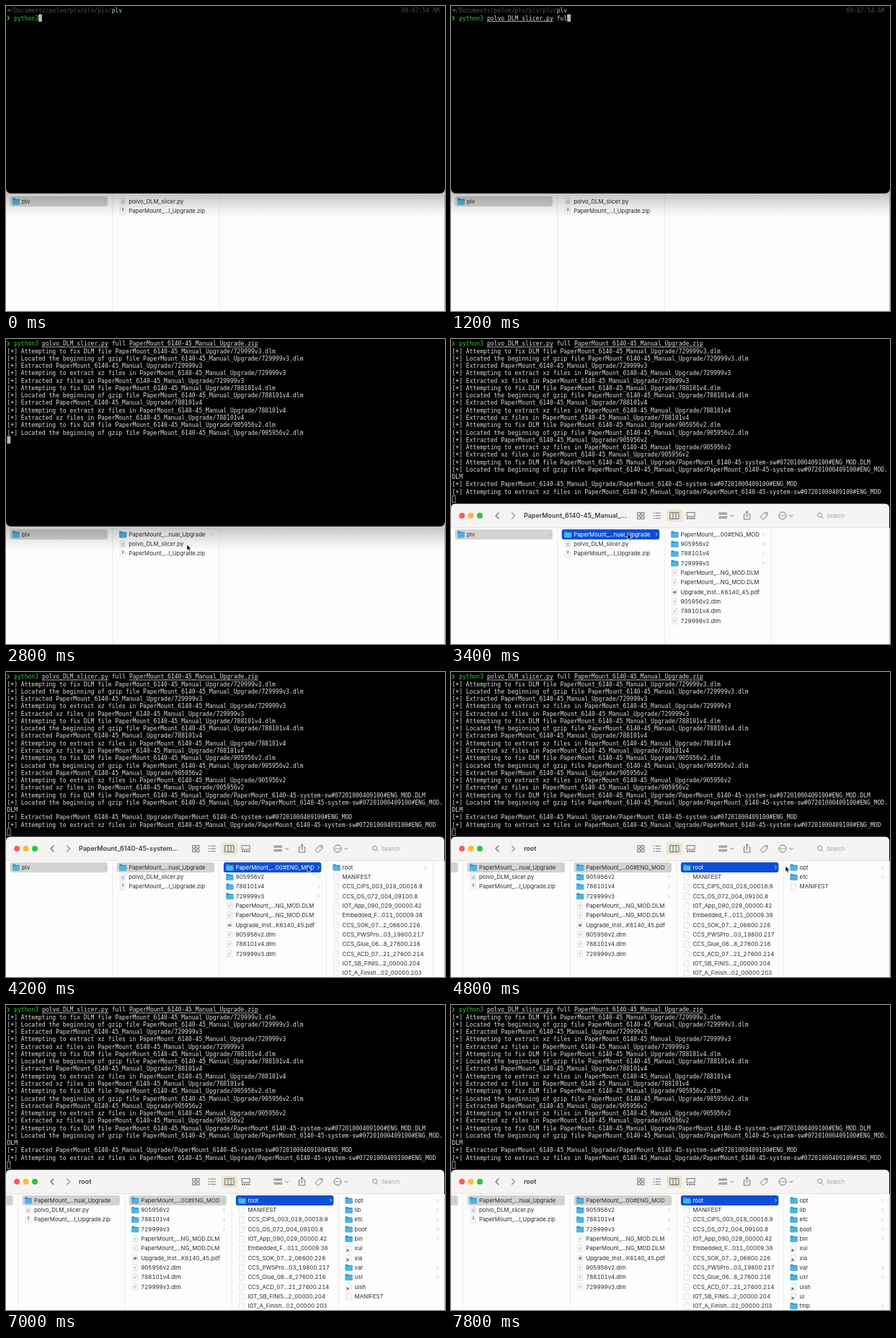
Animation of 609x423 px, one loop 8 s. Source, as an HTML page:

```html
<!DOCTYPE html>
<html lang="en">
<head>
<meta charset="utf-8">
<title>Terminal and file browser</title>
<style>
html, body { margin: 0; width: 100%; height: 100%; overflow: hidden; background: #000; }
svg { display: block; width: 100%; height: 100%; }
text { white-space: pre; }
.mono { font: 8.04px "DejaVu Sans Mono", monospace; }
.ui { font: 7.85px Inter, sans-serif; font-variant-numeric: tabular-nums; }
.title { font: 600 8.95px Inter, sans-serif; }
.find { font: 7.6px Inter, sans-serif; }
</style>
</head>
<body>
<svg id="stage" viewBox="0 0 609 423" xmlns="http://www.w3.org/2000/svg"></svg>
<script>
const LOOP = 8000, TICK = 200;
const CW = 4.84, LH = 10.27, X0 = 1.5;          // terminal grid
const COL = 148.2, ROW = 13.3, TOP = 271;       // browser columns
const FRONT = 3400, OPEN_MOD = 4000, OPEN_ROOT = 4400;

const model = 'PaperMount_6140-45';
const dir = model + '_Manual_Upgrade';
const mod = model + '-system-sw#07201000409100#ENG_MOD';
const script = 'polvo_DLM_slicer.py';
const green = '#35c935', grey = '#dedede';
const BLUE = '#0b4fd6', PATH = '#d4d3d2';

const log = [];
for (const id of ['729999v3', '788101v4', '905956v2', mod]) {
  const path = dir + '/' + id, last = id === mod;
  const file = path + (last ? '.DLM' : '.dlm');
  log.push('Attempting to fix DLM file ' + file, 'Located the beginning of gzip file ' + file,
    'Extracted ' + path, 'Attempting to extract xz files in ' + path);
  if (!last) log.push('Extracted xz files in ' + path);
}
const rows = log.flatMap(s => ('[+] ' + s).match(/.{1,125}/g));

// trailing "/" marks a folder, "@" a link
const home = [script, 'PaperMount_...l_Upgrade.zip'];
const unpacked = ['PaperMount_...nual_Upgrade/', ...home];
const parts = ['PaperMount_...00#ENG_MOD/', '905956v2/', '788101v4/', '729999v3/',
  'PaperMount_...NG_MOD.DLM', 'PaperMount_...NG_MOD.DLM', 'Upgrade_Inst...K6140_45.pdf',
  '905956v2.dlm', '788101v4.dlm', '729999v3.dlm'];
const modules = ['root/', 'MANIFEST', 'CCS_CiPS_003_018_00018.9', 'CCS_OS_072_004_09100.8',
  'IOT_App_090_029_00000.42', 'Embedded_F...011_00009.38', 'CCS_SOK_07...2_06600.226',
  'CCS_PWSPro...03_19800.217', 'CCS_Glue_06...8_27600.216', 'CCS_ACD_07...21_27600.214',
  'IOT_SB_FINIS...2_00000.204', 'IOT_A_Finish...02_00000.203'];
const tree = 'opt/ lib/ etc/ boot/ bin/ xui@ xia@ var/ usr/ uish@ ui@ tmp/'.split(' ');

// [time, value] steps
const typed = [[0, ''], [200, ' '], [400, ' p'], [600, ' ' + script + ' '],
  [1000, ' ' + script + ' f'], [1200, ' ' + script + ' ful'], [1400, ' ' + script + ' full '],
  [1600, ' ' + script + ' full P'], [1800, ' ' + script + ' full ' + dir + '.zip']];
const printed = [[0, 0], [2200, 1], [2400, 3], [2600, 7], [2800, 12], [3000, 14], [3200, 17], [3400, 20]];
const grown = [[0, 0], [6400, 3], [6600, 5], [6800, 8], [7000, 10], [7200, 12]];
const mouse = [[2600, 262, 291], [2800, 251, 285], [3200, 246, 271], [3400, 245, 270],
  [3800, 372, 269], [4000, 372, 269], [4400, 464, 269], [4800, 464, 269], [5400, 540, 425]];

const at = (steps, t) => steps.filter(s => s[0] <= t).pop()[1];
const rect = (x, y, w, h, fill, r = 0, more = '') =>
  `<rect x="${x}" y="${y}" width="${w}" height="${h}" rx="${r}" fill="${fill}" ${more}/>`;
const line = (d, color, w = 1, fill = 'none') =>
  `<path d="${d}" fill="${fill}" stroke="${color}" stroke-width="${w}" stroke-linecap="round" stroke-linejoin="round"/>`;
const dot = (x, y, r, fill, more = '') => `<circle cx="${x}" cy="${y}" r="${r}" fill="${fill}" ${more}/>`;
const label = (cls, x, y, s, fill) => `<text class="${cls}" x="${x}" y="${y}" fill="${fill}">${s}</text>`;
const cell = (row, col, s, fill = grey) => label('mono', X0 + col * CW, 9.3 + row * LH, s, fill);

function linked(row, col, s) {
  return cell(row, col, s) + rect(X0 + col * CW, 10.6 + row * LH, s.length * CW, 0.8, grey);
}

function caret(row, col, hollow) {
  const x = X0 + col * CW, y = 1.2 + row * LH;
  return hollow ? rect(x + 0.4, y + 0.4, 4.1, 9.4, 'none', 0, 'stroke="#b4b4b4" stroke-width=".8"')
    : rect(x, y, CW, LH, '#b9b9b9');
}

function command(row, text) {
  const y = 6.5 + row * LH;
  const [, name, mode, zip] = text.split(' ');
  let s = line(`M2.4 ${y - 2.7}l2 2.7-2 2.7`, green, 1.2) + cell(row, 2, 'python3', green);
  if (name) s += name === script ? linked(row, 10, name) : cell(row, 10, name);
  if (mode) s += cell(row, 30, mode);
  if (zip) s += zip.length > 1 ? linked(row, 35, zip) : cell(row, 35, zip);
  return s;
}

function terminal(t) {
  const text = at(typed, t);
  if (t < 2000) {
    return cell(0, 0, '~', '#d8d8d8') + cell(0, 1, '/Documents/polvo/plv/plv/plv/', '#4c5254') +
      cell(0, 30, 'plv', '#a5dcec') + cell(0, 113, '09:07:54 AM', '#454b4b') +
      command(1, text) + caret(1, 9 + text.length);
  }
  const n = at(printed, t);
  return command(0, text) + rows.slice(0, n).map((s, i) => cell(i + 1, 0, s)).join('') +
    caret(n + 1, 0, t >= FRONT);
}

function icon(x, y, name) {
  if (name.endsWith('/')) {
    return `<path d="M${x} ${y - 3.6}q0-.8.8-.8h2.6l1.2 1.2h4.6q.8 0 .8.8v6q0 .8-.8.8h-8.4q-.8 0-.8-.8z" fill="#2b93c8"/>` +
      rect(x, y - 2, 10, 6.3, '#4db4e4', 0.8);
  }
  let s = line(`M${x + 1.5} ${y - 4.6}h4.6l2.2 2.2v7h-6.8zM${x + 6.1} ${y - 4.6}v2.2h2.2`, '#d6d6d6', 0.6, '#fafafa');
  if (/py$/.test(name)) s += line(`M${x + 3} ${y - 1}h3.8m-3.8 1.7h3.8m-3.8 1.7h3.8`, '#999', 0.7);
  if (/zip$/.test(name)) s += line(`M${x + 4.9} ${y - 3.6}v3.6`, '#777', 1.3);
  if (/pdf$/.test(name)) s += rect(x + 2.8, y - 1.2, 4.2, 3.4, '#8d8d8d', 0.6);
  if (/dlm$/i.test(name)) s += line(`M${x + 4.2} ${y + 2}v-2.6h1.8`, '#a6a6a6', 0.9);
  if (name.endsWith('@')) s += line(`M${x + 1.6} ${y + 4.4}l2.6-2.6m-2 0h2v2`, '#222', 0.8);
  return s;
}

// pick: colour behind the first entry
function column(i, list, pick) {
  const x = i * COL;
  let s = rect(x + COL - 0.7, 262, 0.8, 161, '#e4e4e4');
  if (pick) s += rect(x + 5.5, TOP - 6.9, 135.5, 13.8, pick, 3);
  list.forEach((name, k) => {
    const y = TOP + k * ROW, lit = k === 0 && pick === BLUE;
    s += icon(x + 9, y, name) + label('ui', x + 22, y + 2.8, name.replace(/[/@]$/, ''), lit ? '#fff' : '#2c2c2c');
    if (name.endsWith('/')) s += line(`M${x + 136.3} ${y - 1.8}l1.8 1.8-1.8 1.8`, lit ? '#fff' : '#b2b2b2', 0.8);
  });
  return s;
}

function columns(t) {
  const front = t >= FRONT;
  let s = column(0, ['plv/'], PATH);
  s += column(1, t < 2400 ? home : unpacked, front && (t < OPEN_MOD ? BLUE : PATH));
  if (front) s += column(2, parts, t >= OPEN_MOD && (t < OPEN_ROOT ? BLUE : PATH));
  if (t >= OPEN_MOD) s += column(3, modules, t >= OPEN_ROOT && BLUE);
  if (t >= OPEN_ROOT) {
    const n = at(grown, t);
    s += column(4, [...(n ? tree.slice(0, n) : ['opt/', 'etc/']), 'MANIFEST']);
  }
  const p = Math.min(1, Math.max(0, (t - 4200) / 400));
  const shift = 131.2 * p * p * (3 - 2 * p);
  return `<g transform="translate(${-shift} 0)">${s}</g>`;
}

function toolbar(t) {
  const c = '#626262';
  const name = t < OPEN_MOD ? model + '_Manual_...' : t < OPEN_ROOT ? model + '-system...' : 'root';
  let s = rect(608, 228, 1, 34, '#000') +
    '<path d="M0 262V234.5q0-6 6-6h596q6 0 6 6v27.5z" fill="#f5f4f3"/>' + rect(0, 261.4, 608, 0.8, '#dedede');
  ['#fb5b54', '#fbbb2f', '#2ac53f'].forEach((f, i) => s += dot(15.2 + i * 12.4, 245, 4, f));
  s += line('M66 241l-4 4 4 4', c, 1.1) + line('M84.4 241l4 4-4 4', '#8c8c8c', 1.1);
  s += label('title', 101, 248.2, name, '#3f3f3f');
  for (const x of [259, 264.4]) for (const y of [240.6, 246]) s += line(`M${x} ${y}h3.6v3.6h-3.6z`, c, 0.9);
  for (const y of [241.3, 245, 248.7]) s += dot(281.4, y, 0.7, c) + line(`M284 ${y}h6.4`, c, 0.9);
  s += rect(299, 236.5, 22, 17, '#eae5d2', 3) + line('M304 240.7h12v8.8h-12zm4 0v8.8m4-8.8v8.8', c, 0.9);
  s += line('M327.5 240.7h10.6v5.4h-10.6z', c, 0.9);
  for (let i = 0; i < 4; i++) s += rect(327.1 + i * 3.1, 247.8, 2, 2, c);
  for (let i = 0; i < 6; i++) {
    s += line(`M${372.4 + (i % 3) * 3.9} ${i < 3 ? 241 : 246.4}h2.2v2.2h-2.2z`, c, 0.8);
  }
  for (const x of [387.6, 469.8]) s += line(`M${x} 244.2l2.1 2.1 2.1-2.1`, c, 0.9);
  s += line('M408 243h-1.6v7h8.4v-7h-1.6m-2.6 3.6v-7.6m-2 2l2-2 2 2', c, 0.9);
  s += line('M429.4 246.4l5.4-5.4 4-.2-.2 4-5.4 5.4z', c, 0.9) + dot(436.8, 242.8, 0.6, c);
  s += dot(460, 245, 5, 'none', `stroke="${c}" stroke-width=".9"`);
  for (const x of [457.7, 460, 462.3]) s += dot(x, 245, 0.7, c);
  s += dot(511.5, 244.3, 3, 'none', 'stroke="#7c7c7c" stroke-width=".9"') + line('M513.8 246.6l2.4 2.4', '#7c7c7c', 0.9);
  return s + label('find', 521, 248, 'Search', '#a2a2a2');
}

function pointer(t) {
  const i = mouse.findIndex(m => m[0] > t);
  if (i < 1) return '';
  const [a, x, y] = mouse[i - 1], [b, u, v] = mouse[i], p = (t - a) / (b - a);
  return `<path transform="translate(${x + (u - x) * p} ${y + (v - y) * p})" ` +
    'd="M0 0v8.2l1.9-1.7 1.3 2.9 1.5-.7-1.3-2.8h2.5z" fill="#000" stroke="#fff" stroke-width=".7"/>';
}

const shade = '<defs><linearGradient id="shade" x1="0" y1="0" x2="0" y2="1">' +
  [[0, 0.36], [0.3, 0.2], [0.75, 0.06], [1, 0]]
    .map(([o, a]) => `<stop offset="${o}" stop-color="#000" stop-opacity="${a}"/>`).join('') +
  '</linearGradient></defs>';

function draw(t) {
  const pane = rect(0, 260, 609, 163, '#fdfdfd') + columns(t) + rect(608, 262, 1, 161, '#b4c3ce');
  if (t >= FRONT) return rect(0, 0, 609, 423, '#000') + terminal(t) + pane + toolbar(t) + pointer(t);
  return shade + rect(0, 250, 609, 173, '#fdfdfd') + pane + rect(0, 250, 609, 43, 'url(#shade)') +
    '<path d="M0 0h609v252q0 8-8 8H8q-8 0-8-8z" fill="#000"/>' + terminal(t) + pointer(t);
}

const stage = document.getElementById('stage');
let start, shown = -1;
function frame(now) {
  start ??= now;
  const t = Math.floor(((now - start) % LOOP) / TICK) * TICK;
  if (t !== shown) stage.innerHTML = draw(shown = t);
  requestAnimationFrame(frame);
}
stage.innerHTML = draw(0);
requestAnimationFrame(frame);
</script>
</body>
</html>
```
